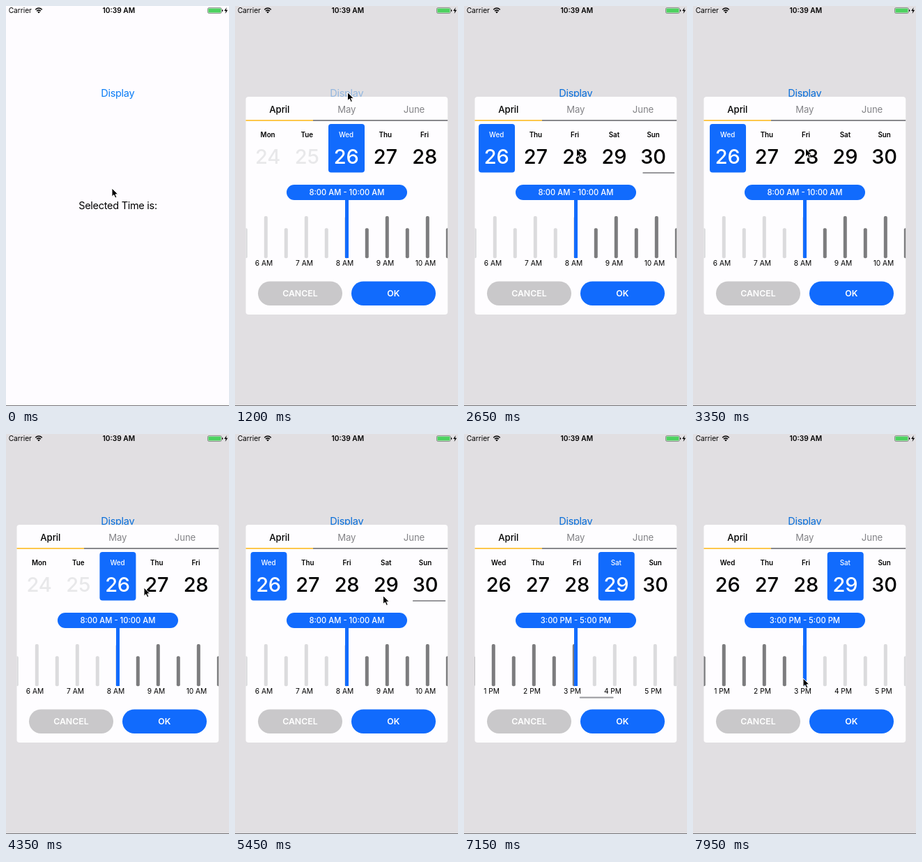
These frames come from a looping animation (320x573 px, 8 s). An HTML page:

```html
<!DOCTYPE html>
<html lang="en">
<head>
<meta charset="utf-8">
<title>Time picker</title>
<style>
  html, body { margin: 0; width: 100%; height: 100%; overflow: hidden; background: #fefcff; }
  svg { display: block; width: 100%; height: 100%; font-family: Inter, Roboto, sans-serif; }
  text { text-anchor: middle; }
  .body { font-size: 14.5px; letter-spacing: -.28px; }
  .status { font-size: 10.2px; }
  .tab { font-size: 13.2px; letter-spacing: -.1px; fill: #838387; }
  .weekday { font-size: 9.8px; font-weight: 600; }
  .day { font-size: 29px; font-weight: 500; letter-spacing: -.2px; }
  .past .day { fill: #e8e8ea; }
  .cell rect { fill: none; }
  .cell.selected rect, .accent { fill: #116bfd; }
  .cell.selected text { fill: #fff; }
  .cell.selected .weekday { font-weight: 500; }
  .range { font-size: 11.2px; font-weight: 500; fill: #fff; }
  .hour { font-size: 10.2px; }
  .bar { fill: #98989c; }
  .button { font-size: 12.3px; font-weight: 600; fill: #fff; }
</style>
</head>
<body>
<svg viewBox="0 0 320 573">
  <defs>
    <clipPath id="cardClip"><rect x="15.5" y="130" width="289.7" height="312" rx="4"/></clipPath>
  </defs>
  <rect width="320" height="573" fill="#fefcff"/>
  <text id="display" class="body" x="160.3" y="129.6" fill="#087bf5">Display</text>
  <text class="body" x="160.5" y="291.2">Selected Time is:</text>
  <rect id="shade" width="320" height="573" opacity=".115"/>
  <rect y="572" width="320" height="1" fill="#77767a"/>

  <g class="status">
    <text x="20.3" y="10">Carrier</text>
    <text x="161.8" y="10" font-weight="600">10:39 AM</text>
    <path d="M42.2 5.2Q47 .9 51.8 5.2M44 7.2Q47 4.5 50 7.2" fill="none" stroke="#000" stroke-width="1.5"/>
    <path d="M45.2 8.5Q47 7 48.8 8.5L47 10.4Z"/>
    <rect x="289.6" y="2.6" width="19.6" height="7.8" rx="1.6" fill="#fff" stroke="#555" stroke-width=".7"/>
    <rect x="290.4" y="3.4" width="18" height="6.2" rx=".9" fill="#4cd15f"/>
    <path d="M310 5q1.3 .2 1.3 1.5t-1.3 1.5z"/>
    <path d="M316.7 2L313.2 7H315.5L314.6 11L318.2 5.8H315.8Z"/>
  </g>

  <g id="card" clip-path="url(#cardClip)">
    <rect x="15" y="130" width="291" height="312" fill="#fefdff"/>
    <text class="tab" x="63.8" y="152.6" style="fill:#000" font-weight="500">April</text>
    <text class="tab" x="160.3" y="152.6">May</text>
    <text class="tab" x="257" y="152.6">June</text>
    <rect x="15" y="163" width="97" height="1.8" fill="#fdc239"/>
    <rect x="112" y="163" width="194" height="1.8" fill="#7c7c80"/>
    <g id="days"></g>
    <rect id="dayBar" class="bar" y="238" height="2" rx="1"/>
    <g id="ticks"></g>
    <rect id="tickBar" class="bar" y="376.5" width="49" height="2" rx="1"/>
    <rect class="accent" x="158" y="270" width="5" height="91"/>
    <rect class="accent" x="74" y="256" width="173" height="22" rx="11"/>
    <text id="range" class="range" x="160.4" y="271"></text>
    <rect x="33" y="394.5" width="121" height="34.5" rx="17.2" fill="#c9c8ca"/>
    <rect class="accent" x="167" y="394.5" width="121" height="34.5" rx="17.2"/>
    <text class="button" x="93.4" y="416.2">CANCEL</text>
    <text class="button" x="227.3" y="416.2">OK</text>
  </g>

  <path id="cursor" d="M0 0V12.2L2.8 9.6L4.8 14L6.9 13.1L5 8.8H8.8Z" stroke="#fff" stroke-linejoin="round"/>
</svg>
<script>
const LOOP = 8000, STEP = 50;
const DAY_PITCH = 56.25, HOUR_PITCH = 58, CENTER = 160.3;
const LAST_SCROLL = 110, BAR_WIDTH = 49;
const OPEN_AT = 1200, SELECT_AT = 5850, TICK_DRAG = 6400;
const dayFlings = [2050, 3570, 4770];
const WEEKDAYS = ['Mon', 'Tue', 'Wed', 'Thu', 'Fri', 'Sat', 'Sun'];

const stops = [
  { at: 0, x: 152, y: 261 },
  { at: 600, x: 161.5, y: 123.5 },
  { at: 2000, x: 208, y: 207 },
  { at: 2400, x: 10, y: 204 },
  { at: 2650, x: 161.5, y: 204 },
  { at: 3950, x: 198, y: 220 },
  { at: 5100, x: 80, y: 226 },
  { at: 5450, x: 212.5, y: 231.5 },
  { at: 6400, x: 236, y: 333 },
  { at: 6900, x: 110, y: 338 },
  { at: 7800, x: 158, y: 350 }
];

const el = id => document.getElementById(id);
const between = (t, start, end) => t >= start && t < end;

function setAttrs(id, attrs) {
  for (const name in attrs) el(id).setAttribute(name, attrs[name]);
}

function glide(t, start, duration) {
  const p = Math.max(0, Math.min(1, (t - start) / duration));
  return p * p * (3 - 2 * p);
}

// Damped spring from 0 to 1 with a slight overshoot.
function fling(t, start) {
  const s = Math.max(0, t - start) / 1000;
  return 1 - Math.exp(-6 * s) * Math.cos(5.5 * s);
}

function pointerAt(t) {
  let { x, y } = stops[0];
  stops.slice(1).forEach((stop, i) => {
    const travel = Math.min(550, stop.at - stops[i].at);
    const p = glide(t, stop.at - travel, travel);
    x += (stop.x - x) * p;
    y += (stop.y - y) * p;
  });
  return `translate(${x} ${y})`;
}

const hour12 = hour => (Math.floor(hour) + 11) % 12 + 1;
const suffix = hour => hour < 12 ? 'AM' : 'PM';
const clock = hour => `${hour12(hour)}:${hour % 1 ? '30' : '00'} ${suffix(hour)}`;

function buildDays() {
  let markup = '';
  for (let day = 20; day <= 30; day++) {
    const x = CENTER - .3 + (day - 26) * DAY_PITCH;
    markup += `<g class="cell${day < 26 ? ' past' : ''}" data-day="${day}">
      <rect x="${x - 26}" y="169" width="52" height="69.5" rx="4"/>
      <text class="weekday" x="${x - .4}" y="188.2">${WEEKDAYS[(day - 17) % 7]}</text>
      <text class="day" x="${x - .4}" y="225.5">${day}</text></g>`;
  }
  el('days').innerHTML = markup;
}

function buildTicks() {
  let markup = '';
  for (let hour = 5; hour <= 18; hour += .5) {
    const x = CENTER + (hour - 8) * HOUR_PITCH;
    const whole = hour % 1 === 0;
    const top = whole ? 301 : 318.3;
    const color = hour >= 8 && hour <= 15 ? '#7c7c7e' : '#dbdbdd';
    markup += `<rect x="${x - 2.5}" y="${top}" width="5" height="${361.3 - top}" rx="2" fill="${color}"/>`;
    if (whole) {
      markup += `<text class="hour" x="${x - 2.8}" y="371.5">${hour12(hour)} ${suffix(hour)}</text>`;
    }
  }
  el('ticks').innerHTML = markup;
}

function draw(t) {
  const [toEnd, back, again] = dayFlings.map(start => fling(t, start));
  const dayScroll = LAST_SCROLL * (toEnd - back + again);
  const tickScroll = 7 * HOUR_PITCH * glide(t, TICK_DRAG, 600)
    + 2 * (glide(t, TICK_DRAG, 700) - glide(t, 7150, 250));
  const start = 8 + Math.round(tickScroll / HOUR_PITCH * 2) / 2;
  const selected = t < SELECT_AT ? '26' : '29';
  const past = dayScroll - LAST_SCROLL;
  const barWidth = BAR_WIDTH - Math.max(0, past);

  for (const id of ['shade', 'card']) setAttrs(id, { visibility: t < OPEN_AT ? 'hidden' : 'visible' });
  setAttrs('display', { opacity: 1 - .8 * (glide(t, 900, 150) - glide(t, 1100, 350)) });
  setAttrs('cursor', {
    transform: pointerAt(t),
    visibility: between(t, 7050, 7350) ? 'hidden' : 'visible'
  });

  setAttrs('days', { transform: `translate(${-dayScroll} 0)` });
  for (const cell of el('days').children) {
    cell.classList.toggle('selected', cell.dataset.day === selected);
  }
  setAttrs('dayBar', {
    x: 302.3 - barWidth + Math.min(0, past) * .17,
    width: barWidth,
    opacity: dayFlings.some(at => between(t, at, at + 720)) ? 1 : 0
  });

  setAttrs('ticks', { transform: `translate(${-tickScroll} 0)` });
  setAttrs('tickBar', {
    x: 15.7 + (8 * HOUR_PITCH + tickScroll) * .172,
    opacity: between(t, TICK_DRAG, 7350) ? 1 : 0
  });
  el('range').textContent = `${clock(start)} - ${clock(start + 2)}`;
}

buildDays();
buildTicks();
draw(0);
const began = performance.now();
function frame() {
  const t = (performance.now() - began + 1) % LOOP;
  draw(Math.floor(t / STEP) * STEP);
  requestAnimationFrame(frame);
}
requestAnimationFrame(frame);
</script>
</body>
</html>
```
